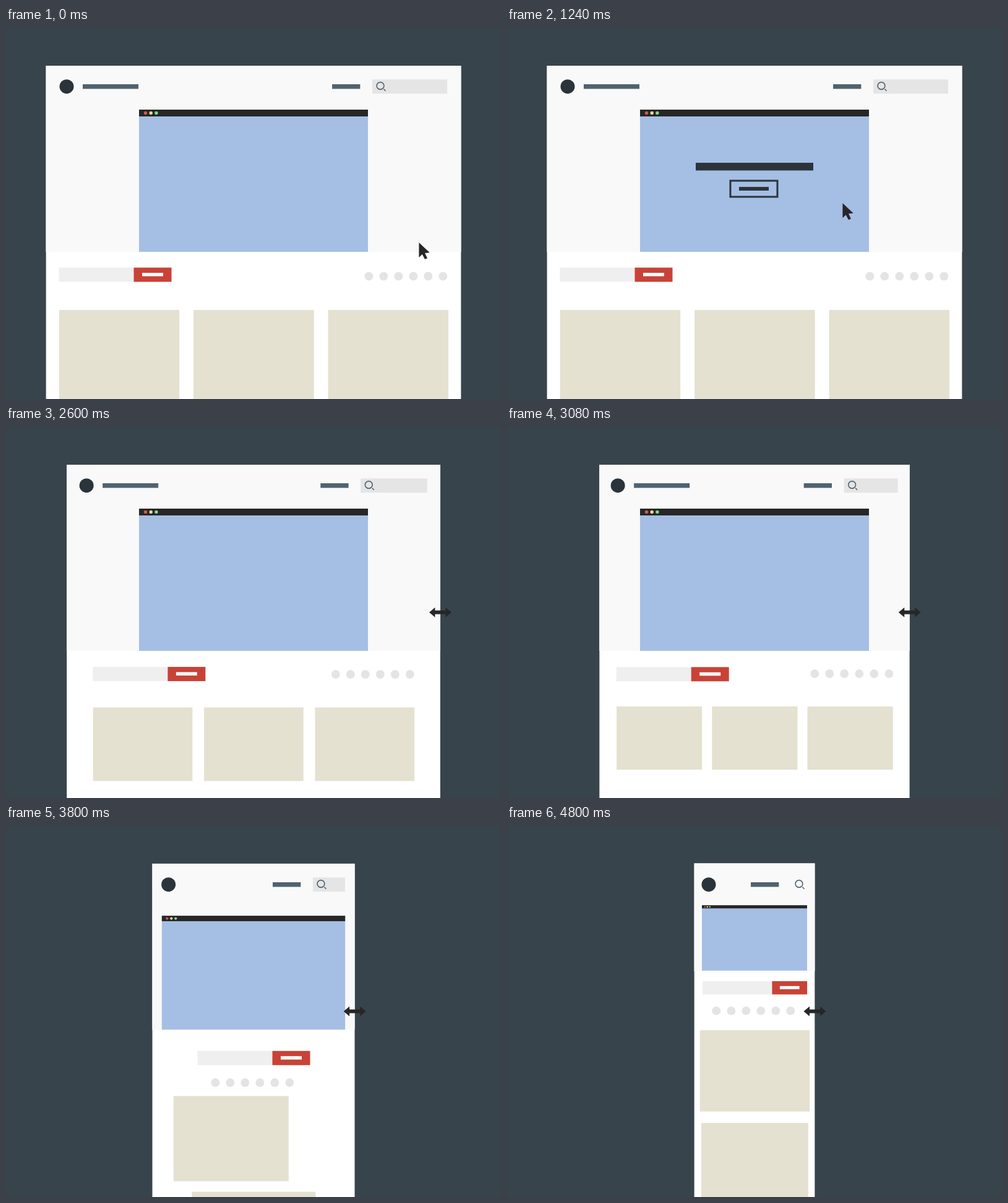
These frames come from a looping animation (800x600 px, 6.72 s). An HTML page with a canvas:

```html
<!DOCTYPE html>
<html lang="en">
<head>
<meta charset="utf-8">
<title>Responsive page</title>
<style>
  html, body { margin: 0; width: 100%; height: 100%; overflow: hidden; background: #38444c; }
  canvas { display: block; }
</style>
</head>
<body>
<canvas id="stage" width="800" height="600"></canvas>
<script>
const ctx = document.getElementById('stage').getContext('2d');
const LOOP = 6720, STEP = 40;
const INK = '#2b343b', SLATE = '#51626f', BLACK = '#272727';

// Layout phases: narrow three columns, fold them into one, then shrink that column.
const RESIZE = 1920, FOLD = 3120, SINGLE = 4060, END = 4800;
let now = 0;

// Smooth progress from 0 to 1 between two times.
function ease(from, to) {
  const s = Math.min(1, Math.max(0, (now - from) / (to - from)));
  return s * s * (3 - 2 * s);
}

const mix = (a, b, p) => a + (b - a) * p;

function bezier(u, a, b, c, d) {
  const v = 1 - u;
  return v * v * v * a + 3 * v * v * u * b + 3 * v * u * u * c + u * u * u * d;
}

function rect(color, left, top, right, bottom) {
  ctx.fillStyle = color;
  ctx.fillRect(left, top, right - left, bottom - top);
}

// Rectangle given by its centre.
function box(color, x, y, w, h) {
  rect(color, x - w / 2, y - h / 2, x + w / 2, y + h / 2);
}

function disc(color, x, y, r) {
  ctx.fillStyle = color;
  ctx.beginPath();
  ctx.arc(x, y, r, 0, 2 * Math.PI);
  ctx.fill();
}

function polygon(color, ...points) {
  ctx.fillStyle = color;
  ctx.beginPath();
  for (const [x, y] of points) ctx.lineTo(x, y);
  ctx.fill();
}

function placed(x, y, scale, draw) {
  ctx.save();
  ctx.translate(x, y);
  ctx.scale(scale, scale);
  draw();
  ctx.restore();
}

function faded(alpha, draw) {
  ctx.globalAlpha = alpha;
  draw();
  ctx.globalAlpha = 1;
}

function drawNav(resize) {
  placed(98 + 228 * resize, 94.7, 1, () => {
    disc(INK, 0, 0, 11.5);
    faded(1 - ease(3200, 3480), () => box(SLATE, 71, 0, 90, 7.5));
  });
  placed(605 - 133 * resize, 94.7, 1, () => {
    box(SLATE, -55.3, 0, 45.3, 7.5);
    faded(1 - ease(4320, 4760), () => rect('#e5e5e5', -13, -11.5, 108 - 95.5 * resize, 11.5));
    ctx.strokeStyle = SLATE;
    ctx.lineWidth = 1.6;
    ctx.beginPath();
    ctx.arc(0, -1.2, 5.9, 0, 2 * Math.PI);
    ctx.moveTo(5.5, 4);
    ctx.lineTo(8.5, 7);
    ctx.stroke();
  });
}

function drawHero(y, scale) {
  placed(400, y, scale, () => {
    box('#a5bee4', 0, 0, 370, 230);
    rect(BLACK, -185, -115, 185, -104);
    ['#cf5a50', '#e6da93', '#86d391'].forEach((c, i) => disc(c, -174.5 + 8.7 * i, -109.5, 2.7));
    faded(ease(640, 800) - ease(1400, 1560), () => {
      box(INK, 0, -22.8, 190, 12.5);
      box(INK, -1, 13, 48, 6);
      ctx.strokeStyle = INK;
      ctx.lineWidth = 3;
      ctx.strokeRect(-39, 0, 76, 26);
    });
  });
}

function drawSignup(narrow, settle) {
  const x = 176.5 + 91.5 * narrow + 132.5 * ease(FOLD, 3770);
  const y = 399 + 0.8 * narrow - 6.8 * ease(FOLD, 3500) - 131.3 * ease(3500, END);
  placed(x, y, 1 - 0.07 * ease(4400, END), () => {
    box('#efefef', -30.5, 0, 121, 23);
    box('#c94237', 60.5, 0, 61, 23);
    box('#fff', 60.5, -0.3, 34, 5.5);
  });
  const stack = ease(FOLD, 3800);
  const dotsX = 646.3 - 89.3 * narrow - 158.7 * stack;
  const dotsY = y + 2.5 - 3.3 * narrow + 41 * stack - 3 * settle;
  for (let i = 0; i < 6; i++) disc('#e4e4e4', dotsX + 24 * (i - 2.5), dotsY, 6.9);
}

function drawCards(narrow) {
  const fold = ease(FOLD, 3800), drop = ease(3240, SINGLE), shrink = ease(SINGLE, END);
  const y = 528 - 25 * narrow - 20 * fold + 29.6 * drop - 116.6 * shrink;
  const columnWidth = 194.5 - 56.5 * narrow - 9 * fold;
  const rowPitch = 210 * drop - 61.7 * shrink;
  for (let i = 0; i < 3; i++) {
    // Later cards start folding a little earlier.
    const columnPitch = mix(217.4 - 63.4 * narrow, 0, ease(3240 - 50 * i, SINGLE));
    const w = mix(columnWidth, 237, ease(3520 - 120 * i, SINGLE)) - (59.5 + 4.5 * i) * shrink;
    box('#e4e1d1', 400.4 + columnPitch * (i - 1), y + rowPitch * i, w, w / 1.35);
  }
}

function drawResizeArrow() {
  box(BLACK, 0, 0, 20, 6);
  for (const side of [-1, 1]) polygon(BLACK, [18 * side, 0], [8.5 * side, -8], [8.5 * side, 8]);
}

function drawPointer() {
  polygon(BLACK, [0, 0], [0, 24], [5.3, 19], [9.6, 27], [13.5, 25.2], [9.6, 17], [17.3, 16.2]);
}

function drawCursor(edge) {
  if (now >= 1800) return placed(edge, 299.7, 1, drawResizeArrow);
  const enter = ease(0, 1240), leave = ease(1240, 1840);
  const x = bezier(enter, 667.4, 635, 553.7, 542.4) + 193 * leave;
  const y = bezier(enter, 347, 368, 273.8, 283.3) + 16 * leave;
  placed(x, y, 1, drawPointer);
}

function draw() {
  const resize = ease(RESIZE, END), narrow = ease(RESIZE, FOLD), settle = ease(3480, END);
  const left = 64.5 + 238 * resize, right = 800 - left, top = 61 - 0.6 * settle;
  const margin = 15.5 - 3 * ease(4120, END);
  const heroScale = Math.min(1, (right - left - 2 * margin) / 370);
  const heroY = 247 - 66 * settle;

  rect('#38444c', 0, 0, 800, 600);
  rect('#fff', left + 0.15, top, right - 0.15, 600);
  rect('#f9f9f9', left, top, right, heroY + 115 * heroScale + ease(4120, END));
  drawNav(resize);
  drawHero(heroY, heroScale);
  drawSignup(narrow, settle);
  drawCards(narrow);
  drawCursor(right);
}

const start = performance.now();
function tick() {
  now = Math.floor((performance.now() - start) % LOOP / STEP) * STEP;
  draw();
  requestAnimationFrame(tick);
}
tick();
</script>
</body>
</html>
```
